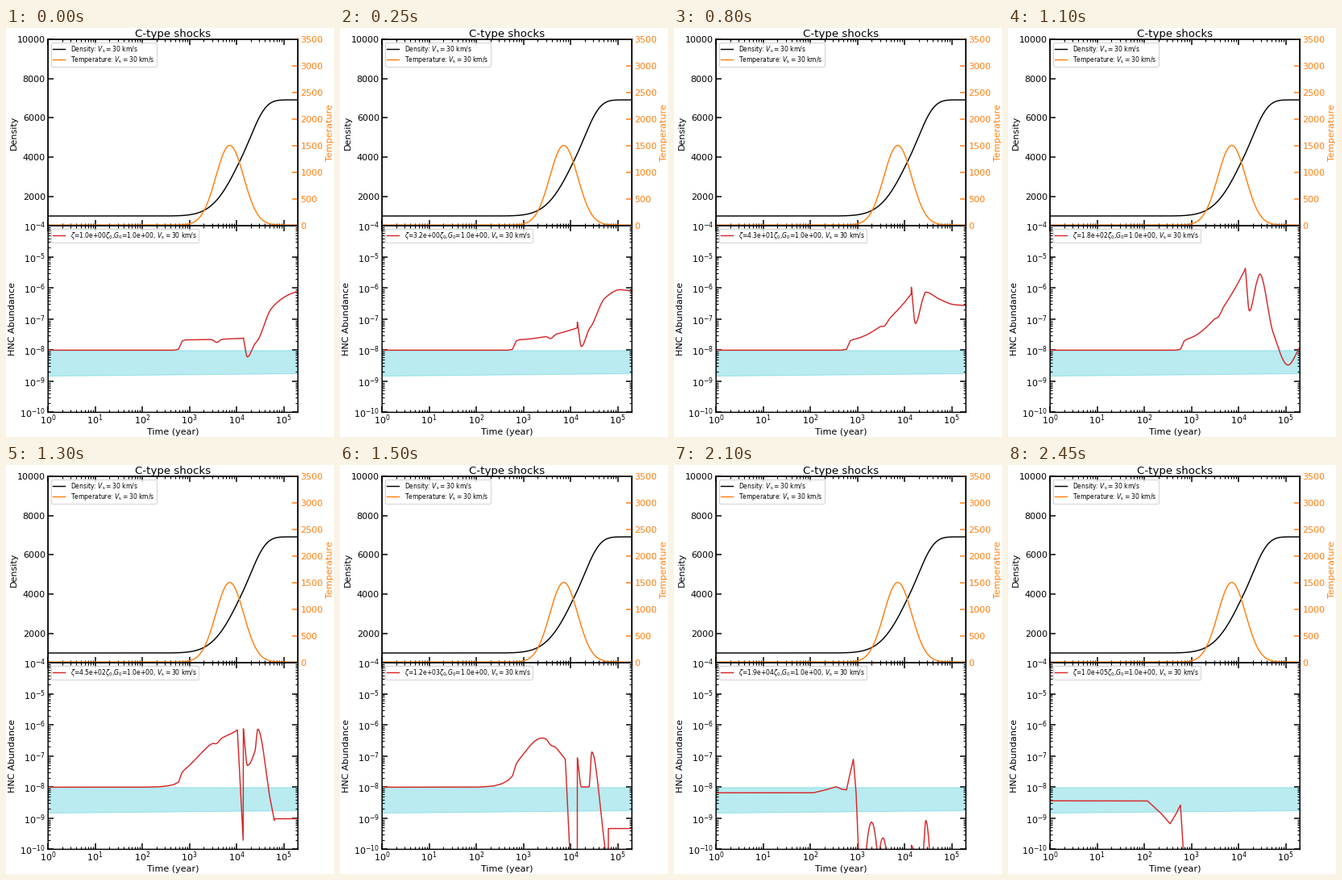
These frames come from a looping animation (407 by 507 pixels, 2.5 s). A matplotlib script:

```python
import numpy as np
import matplotlib.pyplot as plt
from matplotlib.animation import FuncAnimation

W, H, DPI = 407, 507, 80
LEFT, RIGHT, TOP, MID, BOTTOM = 52.2, 362.2, 14.2, 245.2, 476.4
FRAMES, INTERVAL = 50, 50
T_MAX = 2e5
SHOCK = 4.143  # log time at which the shock front arrives
ORANGE = "tab:orange"

plt.rcParams.update({
    "font.family": "DejaVu Sans", "font.size": 10,
    "axes.linewidth": 1.35, "axes.titlesize": 12, "lines.linewidth": 1.3,
    "xtick.direction": "in", "ytick.direction": "in", "xtick.top": True,
    "xtick.major.size": 6, "ytick.major.size": 6,
    "xtick.major.width": 1.35, "ytick.major.width": 1.35,
    "xtick.minor.size": 3, "ytick.minor.size": 3,
    "xtick.minor.width": 1, "ytick.minor.width": 1,
    "xtick.major.pad": 1.1, "ytick.major.pad": 3,
    "legend.fontsize": 6.9, "legend.borderpad": 0.26,
    "legend.labelspacing": 0, "legend.handletextpad": 0.9,
})

# The model is sampled at even time steps, so early samples lie far apart.
t = np.concatenate([[1], 117 * np.arange(1, 1711)])
log_t = np.log10(t)
early = log_t < SHOCK


def step(u, center, width):
    return 0.5 * (1 + np.tanh((u - center) / width))


def bump(u, center, width):
    return np.exp(-((u - center) / width) ** 2)


def tent(z, top, up, down):
    """Straight rise to a peak at z = 2.3, then a straight fall."""
    return top - up * max(2.3 - z, 0) - down * max(z - 2.3, 0)


def arch(z, top, up, down):
    """Straight rise up to z = 1, then an ever steeper fall."""
    return top - up * max(1 - z, 0) - down * max(z - 1, 0) ** 2


def smooth(x, y, u):
    """Monotone cubic curve through the points."""
    h = np.diff(x)
    d = np.diff(y) / h
    m = np.concatenate([d[:1], np.zeros(len(d) - 1), d[-1:]])
    a, b = d[:-1], d[1:]
    same = a * b > 0
    m[1:-1][same] = 2 * a[same] * b[same] / (a + b)[same]
    i = np.clip(np.searchsorted(x, u) - 1, 0, len(h) - 1)
    s = (u - x[i]) / h[i]
    return (y[i] * (1 + 2 * s) * (1 - s) ** 2 + m[i] * h[i] * s * (1 - s) ** 2
            + y[i + 1] * s * s * (3 - 2 * s) + m[i + 1] * h[i] * s * s * (s - 1))


def before_shock(u, z):
    """Log abundance: growth, a hump, a collapse and its echoes."""
    base = -8 - 0.11 * max(z - 3, 0) ** 2
    fade = 1 - np.clip((z - 2.3) / 0.76, 0, 1)
    growth = fade * (0.05 + 0.55 * z + 0.19 * z * z)
    y = base + 0.33 * step(u, 2.81, 0.035) - 0.1 * bump(u, 3.58, 0.07)
    y += growth * (np.clip(u - 2.8, 0, None) / 1.33) ** 1.8

    marks = [2.245, 3.06, 3.67, 4.29, 5]
    height = np.interp(z, marks, [0, 1.25, 1.45, 0.75, 0])
    center = np.interp(z, marks, [3.5, 3.4, 3.12, 2.92, 2.77])
    width = np.interp(z, marks, [0.55, 0.55, 0.5, 0.08, 0.08])
    collapse = np.interp(z, marks, [SHOCK, 3.89, 3.32, 2.94, 2.77])
    lift = np.interp(z, marks, [0, 0, 0, 0.2, -0.75])
    y += height * bump(u, center, width) + lift * bump(u, 2.52, 0.2)
    y -= 30 * np.clip(u - collapse, 0, None)

    first = np.interp(z, marks, [-12, -12, -12, -9.1, -12])
    second = np.interp(z, marks, [-10, -6.6, -7.47, -9.65, -12])
    y = np.maximum(y, first - ((u - 3.3) / 0.12) ** 2)
    return np.maximum(y, second - ((u - 3.54) / 0.11) ** 2)


def after_shock(u, z):
    """Log abundance: a valley, a second peak and a slow settling."""
    valley = tent(z, -6.7, 0.66, 1.7)
    peak = tent(z, -5.5, 0.95, 1.8)
    share = 0.8 * (1 - np.clip((z - 2.3) / 0.7, 0, 1))
    x = np.array([SHOCK, 4.23, 4.39, 4.45, 4.73, 5.05, T_MAX_LOG])
    y = np.array([tent(z, -5.3, 1, 2.3), valley,
                  valley + share * (peak - valley), peak,
                  arch(z, -5.98, 0.7, 0.93), arch(z, -5.86, 0.4, 1.69),
                  arch(z, -6.1, 0, 1.16)])
    settled = -9.33 - 0.77 * (z - 3.06)
    return np.maximum(smooth(x, y, u), np.where(u > 4.8, settled, -20))


T_MAX_LOG = np.log10(T_MAX)


def log_zeta(frame):
    return 5 * frame / (FRAMES - 1)


def abundance(frame):
    z = log_zeta(frame)
    return 10 ** np.concatenate([before_shock(log_t[early], z),
                                 after_shock(log_t[~early], z)])


def label(frame):
    return (rf"$\zeta$={10 ** log_zeta(frame):.1e}$\zeta_0$,$G_0$=1.0e+00, "
            r"$V_{\rm s}=30$ km/s")


def panel(top, bottom):
    ax = fig.add_axes([LEFT / W, 1 - bottom / H,
                       (RIGHT - LEFT) / W, (bottom - top) / H])
    ax.set_xscale("log")
    ax.set_xlim(1, T_MAX)
    return ax


fig = plt.figure(figsize=(W / DPI, H / DPI), dpi=DPI, facecolor="white")

# Shock profile
shock = panel(TOP, MID)
heat = shock.twinx()
grid = np.linspace(0, T_MAX_LOG, 500)
u = grid - 4.1
q = 2.1 * u + 1.6 * np.clip(u, 0, None) ** 2
density = 1000 + 5920 * step(0.798 * q + 0.0357 * q ** 3, 0, 1)
temperature = 15 + 1495 * np.exp(-0.5 * ((grid - 3.855) / 0.295) ** 2)
speed = r": $V_{\rm s}=30$ km/s"
lines = shock.plot(10 ** grid, density, "k", label="Density" + speed)
lines += heat.plot(10 ** grid, temperature, ORANGE, label="Temperature" + speed)
shock.set_ylim(500, 10000)
shock.set_yticks(range(2000, 10001, 2000))
shock.set_ylabel("Density", labelpad=-0.5)
shock.tick_params(labelbottom=False)
shock.set_title("C-type shocks", pad=3)
shock.legend(handles=lines, loc="upper left")
heat.set_ylim(0, 3500)
heat.set_ylabel("Temperature", color=ORANGE, labelpad=3)
heat.tick_params(axis="y", colors=ORANGE)

# Abundance
chem = panel(MID, BOTTOM)
chem.set_yscale("log")
chem.set_ylim(1e-10, 1e-4)
chem.tick_params(axis="y", which="both", right=True)
chem.set_xlabel("Time (year)", labelpad=1.3)
chem.set_ylabel("HNC Abundance", labelpad=3)
chem.fill_between([1, T_MAX], [1.5e-9, 1.8e-9], 1e-8,
                  color="tab:cyan", alpha=0.3)
curve, = chem.plot(t, abundance(0), "tab:red", label=label(0))
caption = chem.legend(loc="upper left").get_texts()[0]

for ax in (shock, heat, chem):
    for spine in ax.spines.values():
        spine.set_snap(False)


def update(frame):
    curve.set_ydata(abundance(frame))
    caption.set_text(label(frame))
    return curve, caption


anim = FuncAnimation(fig, update, frames=FRAMES, interval=INTERVAL,
                     repeat=True, repeat_delay=0)
plt.show()
```
